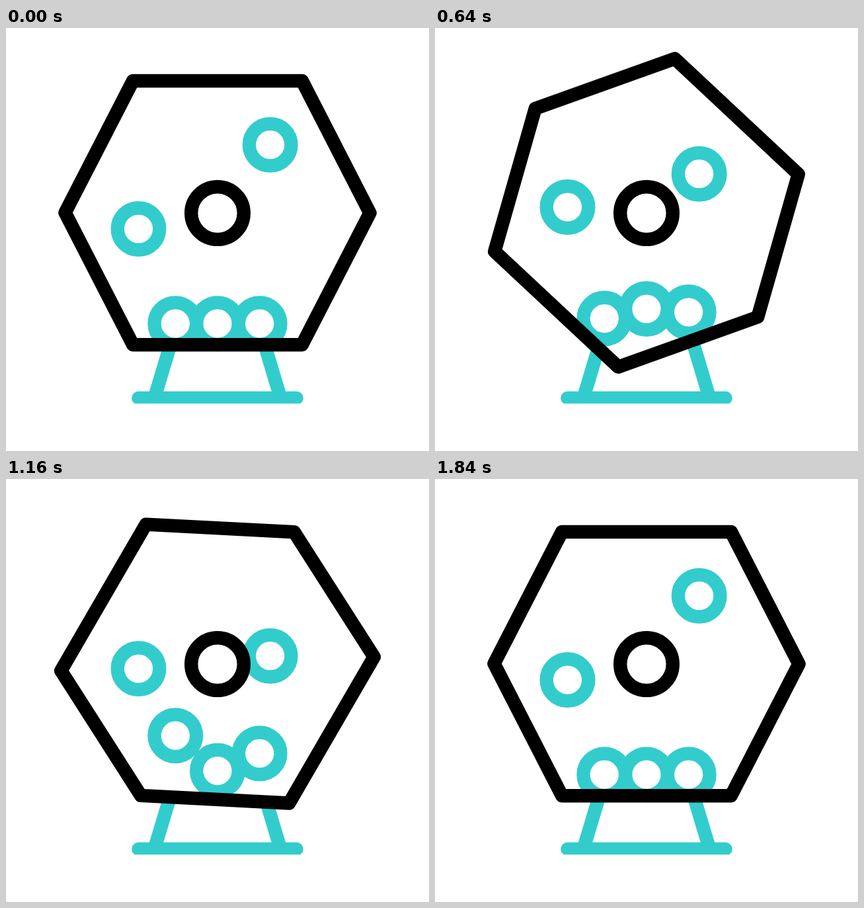
Write an HTML page with a canvas that moves like this. It is 640 px wide and 640 px high and loops after 2 s.

```html
<!DOCTYPE html>
<html lang="en">
<head>
<meta charset="utf-8">
<title>Raffle drum</title>
<style>
  html, body { margin: 0; width: 100%; height: 100%; overflow: hidden; background: #fff; }
  canvas { display: block; width: 100vw; height: 100vh; }
</style>
</head>
<body>
<canvas id="stage" width="640" height="640"></canvas>
<script>
const ctx = document.getElementById('stage').getContext('2d');
const LOOP = 2000, STEP = 40, START = 80, END = 1840;
const TEAL = '#33cccc', BLACK = '#000', LINE = 20.4;
const CX = 320, CY = 279.6, FLOOR = 447.2, GAP = 63.7;

// Every ball leaves its rest height, tumbles through a few offsets and returns
const BEATS = [START, 320, 640, 1000, 1160, 1400, END];
const ball = (x, rest, ...hops) => ({ x, rest, hops: [0, ...hops, 0] });
const BALLS = [
  ball(CX - GAP, FLOOR, -12, -7.6, -76.4, -59, -51),
  ball(CX, FLOOR, -60.4, -22.2, -24.4, -5.6, -8),
  ball(CX + GAP, FLOOR, -28.6, -17.2, -68.7, -32, -40.7),
  ball(CX + 79.7, 176.7, 125, 44, 126, 91, -32),
  ball(CX - 119.5, 304, 41, -33, 1, -17, -81)
];

const smooth = u => u * u * (3 - 2 * u);
const mix = (a, b, u) => a + (b - a) * u;

function heightAt({ rest, hops }, t) {
  const i = Math.max(1, BEATS.findIndex(beat => t <= beat));
  const u = (t - BEATS[i - 1]) / (BEATS[i] - BEATS[i - 1]);
  return rest + mix(hops[i - 1], hops[i], smooth(u));
}

function ring(x, y, r, color) {
  ctx.strokeStyle = color;
  ctx.beginPath();
  ctx.arc(x, y, r, 0, Math.PI * 2);
  ctx.stroke();
}

function line(x1, y1, x2, y2) {
  ctx.beginPath();
  ctx.moveTo(x1, y1);
  ctx.lineTo(x2, y2);
  ctx.stroke();
}

function stand() {
  ctx.save();
  ctx.beginPath();
  ctx.rect(0, 0, 640, 568.2);
  ctx.clip();
  ctx.strokeStyle = TEAL;
  ctx.lineCap = 'round';
  line(CX - 119.6, 559.9, CX + 119.6, 559.9);
  ctx.lineCap = 'butt';
  for (const side of [-1, 1]) line(CX + side * 68.5, 470, CX + side * 95.5, 560);
  ctx.restore();
}

// The drum is symmetric, so one half is repeated with the opposite sign
function drumPath(angle) {
  const path = new Path2D();
  const c = Math.cos(angle), s = Math.sin(angle);
  for (const sign of [1, -1]) {
    for (const [x, y] of [[-128, -199.6], [128, -199.6], [230.6, 0.2]]) {
      path.lineTo(CX + sign * (x * c - y * s), CY + sign * (x * s + y * c));
    }
  }
  path.closePath();
  return path;
}

function draw(time) {
  const t = Math.min(END, Math.max(START, time));
  const drum = drumPath(Math.PI * smooth((t - START) / (END - START)));

  ctx.fillStyle = '#fff';
  ctx.fillRect(0, 0, 640, 640);
  ctx.lineWidth = LINE;
  ctx.lineJoin = 'round';

  stand();
  ctx.fill(drum);
  for (const b of BALLS) ring(b.x, heightAt(b, t), 31.8, TEAL);
  ctx.strokeStyle = BLACK;
  ctx.stroke(drum);
  ring(CX, 280.1, 39.8, BLACK);
}

const begin = performance.now();
function tick() {
  const now = (performance.now() - begin) % LOOP;
  draw(Math.floor(now / STEP) * STEP);
  requestAnimationFrame(tick);
}
tick();
</script>
</body>
</html>
```
